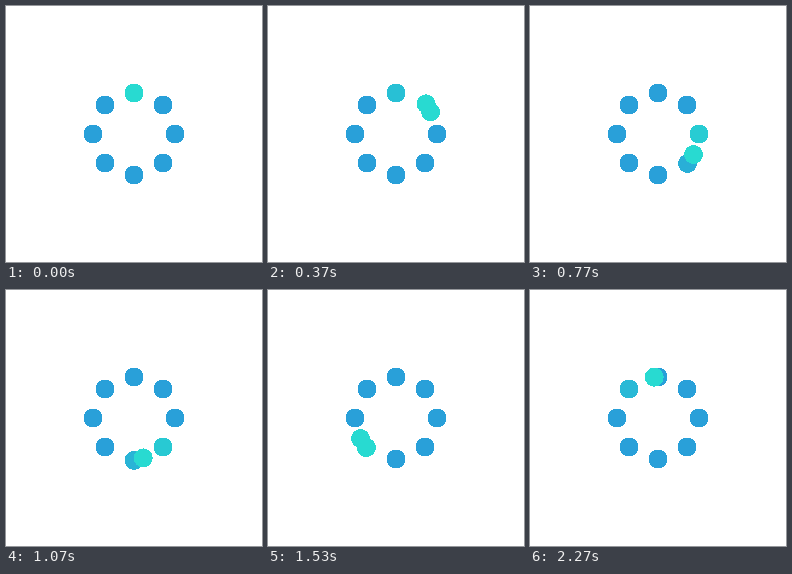
Recreate the animation shown at these times as an HTML page. Size 256 by 256 pixels, loop 2310 ms.

```html
<!DOCTYPE html>
<html lang="en">
<head>
<meta charset="utf-8">
<title>Loading ring</title>
<style>
  html, body { margin: 0; width: 100%; height: 100%; overflow: hidden; background: #fff; }
  svg { display: block; width: 100%; height: 100%; }
</style>
</head>
<body>
<svg id="stage" viewBox="0 0 256 256" shape-rendering="crispEdges"></svg>
<script>
const LOOP = 2310, STEPS = 69, DOTS = 8, CENTER = 128, RING = 41, RADIUS = 9.5;
const LEAD = 4, PUSH = 4.5, PUSH_STEPS = 8, GLOW_STEPS = 13.5;
const BLUE = [41, 160, 217], CYAN = [40, 218, 209];

const stage = document.getElementById('stage');

function addDot() {
  const dot = document.createElementNS(stage.namespaceURI, 'circle');
  dot.setAttribute('r', RADIUS);
  return stage.appendChild(dot);
}

function place(dot, turn, distance, glow) {
  const angle = turn * 2 * Math.PI;
  const rgb = BLUE.map((b, i) => Math.round(b + (CYAN[i] - b) * glow));
  dot.setAttribute('cx', CENTER + distance * Math.sin(angle));
  dot.setAttribute('cy', CENTER - distance * Math.cos(angle));
  dot.setAttribute('fill', `rgb(${rgb})`);
}

// Rises from 0 to 1 and back while age runs from 0 to length
const bump = (age, length) => age > 0 && age < length ? Math.sin(Math.PI * age / length) : 0;

const ring = Array.from({ length: DOTS }, addDot);
const runner = addDot();

function draw(time) {
  // 30 steps per second, on a 10 ms clock
  const tick = Math.floor(time % LOOP / 10) * 10;
  const step = Math.min(STEPS - 1, Math.floor((tick + 5) * .03));
  ring.forEach((dot, i) => {
    // Each dot reacts shortly before the runner reaches it
    const age = step - Math.max(0, i * STEPS / DOTS - LEAD);
    place(dot, i / DOTS, RING + PUSH * bump(age, PUSH_STEPS) ** 2, bump(age, GLOW_STEPS));
  });
  place(runner, step / STEPS, RING, 1);
}

const begin = performance.now();
function loop() {
  draw(performance.now() - begin);
  requestAnimationFrame(loop);
}
loop();
</script>
</body>
</html>
```
